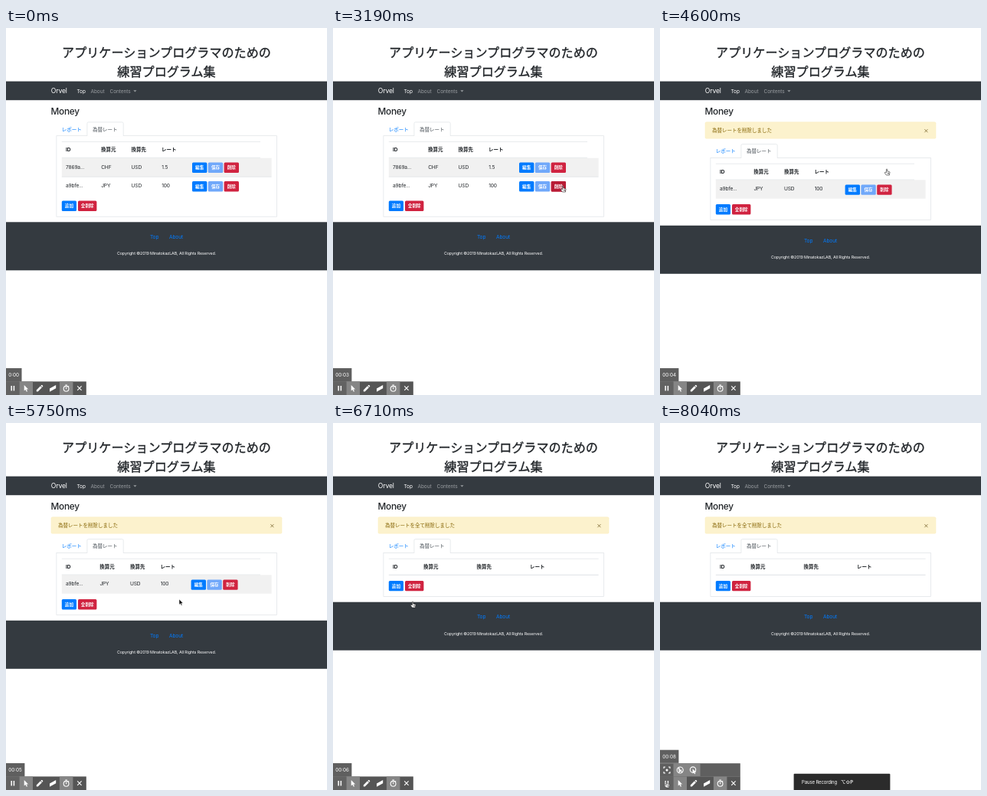
An HTML page for the animation above (8.34 s loop, 419x479 px).

```html
<!DOCTYPE html>
<html lang="ja">
<head>
<meta charset="utf-8">
<title>Money</title>
<style>
html, body { margin: 0; width: 100%; height: 100%; overflow: hidden; background: #fff; }
svg { display: block; width: 419px; height: 479px; }
text { font: 6.6px Inter, sans-serif; letter-spacing: -.02em; }
.ja { font: 6.5px "Noto Sans CJK JP", "Noto Sans CJK", sans-serif; letter-spacing: 0; }
.title { font-size: 16.1px; text-anchor: middle; stroke: #212529; stroke-width: .35; }
.btn { font-size: 5.6px; font-weight: 600; text-anchor: middle; fill: #fff; }
.b { font-weight: 700; }
.line { fill: none; stroke: #dee2e6; stroke-width: .7; }
.icon { fill: none; stroke: #fff; stroke-width: 1.1; }
.solid { fill: #fff; stroke: none; }
.clock { font-size: 6.3px; fill: #fff; letter-spacing: 0; }

/* one shared 8.34 s clock, hard steps throughout */
.a { animation: 8340ms step-end infinite; }
.list { animation-name: list; }
.one { animation-name: one; }
.none { animation-name: none-left; }
.first { animation-name: first; }
.later { animation-name: later; }
.digits { animation-name: digits; }
.dock { animation-name: dock; }
.extra { animation-name: extra; }
.tip { animation-name: tip; }
.move { animation-name: move; }
.arrow { animation-name: arrow; }
.hand { animation-name: hand; }
.over2 { animation-name: over2; }
.over1 { animation-name: over1; }
.overAll { animation-name: over-all; }
.click1 { animation-name: click1; }
.click2 { animation-name: click2; }

@keyframes list { 0% { opacity: 1 } 55.16%, 100% { opacity: 0 } }
@keyframes one { 0% { opacity: 0 } 55.16% { opacity: 1 } 80.46%, 100% { opacity: 0 } }
@keyframes none-left { 0% { opacity: 0 } 80.46%, 100% { opacity: 1 } }
@keyframes first { 0% { opacity: 1 } 1.2%, 100% { opacity: 0 } }
@keyframes later { 0% { opacity: 0 } 1.2%, 100% { opacity: 1 } }
@keyframes digits {
  0% { transform: translateY(0) }
  13.07% { transform: translateY(-20px) }
  24.82% { transform: translateY(-40px) }
  36.1% { transform: translateY(-60px) }
  50% { transform: translateY(-80px) }
  62.35% { transform: translateY(-100px) }
  73.86% { transform: translateY(-120px) }
  86.57% { transform: translateY(-140px) }
  96.4%, 100% { transform: translateY(-160px) }
}
@keyframes dock { 0% { transform: translateY(0) } 94.84%, 100% { transform: translateY(-17.3px) } }
@keyframes extra { 0% { opacity: 0 } 94.84%, 100% { opacity: 1 } }
@keyframes tip { 0% { opacity: 0 } 96.4%, 100% { opacity: 1 } }
@keyframes move {
  0% { transform: translate(269px, 152px) }
  14.87% { transform: translate(262px, 158px) }
  16.67% { transform: translate(253px, 165px) }
  18.35% { transform: translate(245px, 169px) }
  29.62% { transform: translate(250px, 216px) }
  31.77% { transform: translate(266px, 214px) }
  33.93% { transform: translate(281px, 211px) }
  36.1% { transform: translate(292px, 207px) }
  38.25% { transform: translate(300px, 206px) }
  44.96% { transform: translate(299px, 203px) }
  46.64% { transform: translate(298px, 198px) }
  48.32% { transform: translate(297px, 193px) }
  50% { transform: translate(296px, 187px) }
  51.68% { transform: translate(296px, 184px) }
  59.95% { transform: translate(288px, 202px) }
  62.35% { transform: translate(268px, 218px) }
  67.27% { transform: translate(252px, 223px) }
  68.94% { transform: translate(226px, 230px) }
  70.62% { transform: translate(196px, 236px) }
  72.18% { transform: translate(164px, 241px) }
  73.86% { transform: translate(135px, 241px) }
  75.54% { transform: translate(117px, 237px) }
  77.22% { transform: translate(104px, 233px) }
  86.57% { transform: translate(99px, 262px) }
  88.25% { transform: translate(84px, 305px) }
  89.81% { transform: translate(64px, 352px) }
  91.49% { transform: translate(42px, 400px) }
  93.17% { transform: translate(22px, 440px) }
  94.84% { transform: translate(11px, 463px) }
  96.4%, 100% { transform: translate(8.5px, 468px) }
}
@keyframes arrow {
  0% { opacity: 0 } 13.07% { opacity: 1 } 24.82% { opacity: 0 }
  29.62% { opacity: 1 } 36.1% { opacity: 0 } 46.64% { opacity: 1 } 50% { opacity: 0 }
  59.95% { opacity: 1 } 77.22% { opacity: 0 } 82.49% { opacity: 1 } 96.4%, 100% { opacity: 0 }
}
@keyframes hand {
  0% { opacity: 0 } 36.1% { opacity: 1 } 46.64% { opacity: 0 }
  50% { opacity: 1 } 59.95% { opacity: 0 }
  77.22% { opacity: 1 } 82.49% { opacity: 0 } 96.4%, 100% { opacity: 1 }
}
@keyframes over2 { 0% { opacity: 0 } 36.1% { opacity: 1 } 46.64%, 100% { opacity: 0 } }
@keyframes over1 { 0% { opacity: 0 } 50% { opacity: 1 } 55.16%, 100% { opacity: 0 } }
@keyframes over-all { 0% { opacity: 0 } 77.22% { opacity: 1 } 80.46%, 100% { opacity: 0 } }
@keyframes click1 { 0% { opacity: 0 } 53.48% { opacity: 1 } 55.16%, 100% { opacity: 0 } }
@keyframes click2 { 0% { opacity: 0 } 78.9% { opacity: 1 } 80.46%, 100% { opacity: 0 } }
</style>
</head>
<body>
<svg viewBox="0 0 419 479" fill="#212529">
  <defs>
    <g id="edit"><rect width="19.4" height="13.4" rx="1.5"/><text class="ja btn" x="9.7" y="8.9">編集</text></g>
    <g id="save"><rect width="19.4" height="13.4" rx="1.5"/><text class="ja btn" x="9.7" y="8.9">保存</text></g>
    <g id="del"><rect width="19.4" height="13.4" rx="1.5"/><text class="ja btn" x="9.7" y="8.9">削除</text></g>
    <g id="add"><rect width="19.2" height="13.4" rx="1.5"/><text class="ja btn" x="9.6" y="8.9">追加</text></g>
    <g id="delAll"><rect width="24.4" height="13.4" rx="1.5"/><text class="ja btn" x="12.2" y="8.9">全削除</text></g>
    <g id="rowBtns">
      <use href="#edit" fill="#007bff"/>
      <use href="#save" x="20.8" fill="#70a8fa"/>
      <use href="#del" x="41.6" fill="#d02340"/>
    </g>
    <g id="tableBtns">
      <use href="#add" x="72.8" fill="#007bff"/>
      <use href="#delAll" x="94" fill="#d02340"/>
    </g>
    <g id="tabs">
      <path d="M105.9 140.7V124.6q0-1.7 1.7-1.7H151.5q1.7 0 1.7 1.7V140.7" class="line"/>
      <path d="M106.3 140.6H152.8" stroke="#fff" stroke-width="1.2"/>
      <text class="ja" x="72.8" y="134.5" fill="#007bff">レポート</text>
      <text class="ja" x="113" y="134.5" fill="#495057">為替レート</text>
    </g>
    <g id="alert">
      <rect x="59" y="122.8" width="301" height="21.4" rx="1.5" fill="#fcf2cd" stroke="#fbecbc" stroke-width=".5"/>
      <path d="M345.4 132.2l4 4m0-4l-4 4" stroke="#85713a" stroke-width=".9"/>
    </g>
    <g id="footer">
      <rect width="419" height="63" fill="#343a40"/>
      <text x="188" y="21.8" fill="#007bff">Top</text>
      <text x="213" y="21.8" fill="#007bff">About</text>
      <text x="209.5" y="43" fill="#fff" text-anchor="middle" style="font-size:5.35px">Copyright ©2019 MinatokazLAB, All Rights Reserved.</text>
    </g>
  </defs>

  <text class="ja title" x="209.5" y="37.8">アプリケーションプログラマのための</text>
  <text class="ja title" x="209.5" y="62.8">練習プログラム集</text>
  <rect y="69.6" width="419" height="24.6" fill="#343a40"/>
  <text x="58.8" y="85.2" fill="#fff" style="font-size:8.6px">Orvel</text>
  <text x="92.5" y="84.6" fill="#fff">Top</text>
  <text x="110.5" y="84.6" fill="#999da0">About</text>
  <text x="135.6" y="84.6" fill="#999da0">Contents</text>
  <path d="M166.3 81.2h4.2l-2.1 2.2z" fill="#999da0"/>
  <text x="58.6" y="113" style="font-size:11.8px;font-weight:500">Money</text>

  <g class="a list">
    <rect class="line" x="65.9" y="140.7" width="287.6" height="105.5"/>
    <use href="#tabs"/>
    <path class="line" d="M72.8 148.5H332"/>
    <rect x="72.8" y="169.7" width="273.8" height="24.6" fill="#f1f1f1"/>
    <path class="line" d="M72.8 169.3H332M72.8 194.3H346.6"/>
    <text class="b" x="78" y="161.4">ID</text>
    <text class="ja b" x="124" y="161.4">換算元</text>
    <text class="ja b" x="163.5" y="161.4">換算先</text>
    <text class="ja b" x="203" y="161.4">レート</text>
    <text x="78" y="183.5">7869a...</text>
    <text x="124.2" y="183.5">CHF</text>
    <text x="163.6" y="183.5">USD</text>
    <text x="203.3" y="183.5">1.5</text>
    <use href="#rowBtns" x="243" y="175.6"/>
    <text x="78" y="207.9">a9bfe...</text>
    <text x="124.2" y="207.9">JPY</text>
    <text x="163.6" y="207.9">USD</text>
    <text x="203.3" y="207.9">100</text>
    <use href="#rowBtns" x="243" y="200"/>
    <use class="a over2" href="#del" x="284.6" y="200" fill="#b81c35"/>
    <use class="a over1" href="#del" x="284.6" y="175.6" fill="#b0142e"/>
    <rect class="a click1" x="284" y="175" width="20.6" height="14.6" rx="2" fill="none" stroke="#d02340" stroke-opacity=".5" stroke-width="1.4"/>
    <use href="#tableBtns" y="225.6"/>
    <use href="#footer" y="253.3"/>
  </g>

  <g class="a one">
    <use href="#alert"/>
    <text class="ja" x="68" y="136" fill="#856404">為替レートを削除しました</text>
    <rect class="line" x="65.9" y="169.4" width="287.6" height="81.1"/>
    <use href="#tabs" y="28.7"/>
    <path class="line" d="M72.8 177.2H332"/>
    <rect x="72.8" y="198.3" width="273.8" height="24.4" fill="#f1f1f1"/>
    <path class="line" d="M72.8 198H332"/>
    <text class="b" x="78" y="190.1">ID</text>
    <text class="ja b" x="122.2" y="190.1">換算元</text>
    <text class="ja b" x="162" y="190.1">換算先</text>
    <text class="ja b" x="201.5" y="190.1">レート</text>
    <text x="78" y="212.2">a9bfe...</text>
    <text x="122.4" y="212.2">JPY</text>
    <text x="162" y="212.2">USD</text>
    <text x="201.8" y="212.2">100</text>
    <use href="#rowBtns" x="241.6" y="204.4"/>
    <use href="#tableBtns" y="230"/>
    <use class="a overAll" href="#delAll" x="94" y="230" fill="#b0142e"/>
    <rect class="a click2" x="93.4" y="229.4" width="25.6" height="14.6" rx="2" fill="none" stroke="#d02340" stroke-opacity=".5" stroke-width="1.4"/>
    <use href="#footer" y="257.8"/>
  </g>

  <g class="a none">
    <use href="#alert"/>
    <text class="ja" x="68" y="136" fill="#856404">為替レートを全て削除しました</text>
    <rect class="line" x="65.9" y="169.4" width="287.6" height="57"/>
    <use href="#tabs" y="28.7"/>
    <path class="line" d="M72.8 177.2H346.6"/>
    <path class="line" d="M72.8 198.3H346.6" style="stroke-width:1"/>
    <text class="b" x="78" y="190.1">ID</text>
    <text class="ja b" x="118" y="190.1">換算元</text>
    <text class="ja b" x="187.6" y="190.1">換算先</text>
    <text class="ja b" x="257" y="190.1">レート</text>
    <use href="#tableBtns" y="205.9"/>
    <use href="#footer" y="233.7"/>
  </g>

  <!-- recorder bar -->
  <g class="a dock">
    <g class="a first">
      <rect y="444" width="20.5" height="17.5" fill="#5f5f5f"/>
      <text class="clock" x="3.2" y="455">0:00</text>
    </g>
    <g class="a later">
      <rect y="444" width="24.4" height="17.5" fill="#5f5f5f"/>
      <svg y="444" width="25" height="17">
        <g class="a digits">
          <text class="clock" x="3.2" y="11">00:00</text>
          <text class="clock" x="3.2" y="31">00:01</text>
          <text class="clock" x="3.2" y="51">00:02</text>
          <text class="clock" x="3.2" y="71">00:03</text>
          <text class="clock" x="3.2" y="91">00:04</text>
          <text class="clock" x="3.2" y="111">00:05</text>
          <text class="clock" x="3.2" y="131">00:06</text>
          <text class="clock" x="3.2" y="151">00:07</text>
          <text class="clock" x="3.2" y="171">00:08</text>
        </g>
      </svg>
    </g>
  </g>
  <g class="a extra">
    <rect y="444.2" width="104.8" height="17.5" fill="#5f5f5f"/>
    <rect x="17.5" y="444.2" width="35" height="17.5" fill="#858585"/>
    <g class="icon">
      <path d="M5 451v-2h2m4 0h2v2m0 4v2h-2m-4 0h-2v-2"/>
      <circle class="solid" cx="9" cy="453" r="1.5"/>
      <circle cx="26.2" cy="453" r="4"/>
      <path d="M23.4 450.2l5.6 5.6M25 450v5.6l3-3"/>
      <circle cx="43" cy="452.6" r="3.7"/>
      <path class="solid" d="M42.6 451.6v6l1.5-1.3 1 2 1.2-.6-1-2h2z"/>
    </g>
  </g>
  <rect y="461.4" width="104.8" height="17.6" fill="#555"/>
  <rect y="461.4" width="17.5" height="17.6" fill="#626262"/>
  <rect x="17.5" y="461.4" width="17.5" height="17.6" fill="#858585"/>
  <rect x="69.9" y="461.4" width="17.5" height="17.6" fill="#858585"/>
  <g class="icon">
    <path d="M7.2 467v6.6m3.2-6.6v6.6" stroke-width="1.5"/>
    <path class="solid" d="M23.7 466v7.6l1.8-1.6 1.3 2.8 1.2-.6-1.3-2.6h2.4z"/>
    <path class="solid" d="M39.8 474.4v-1.9l5.2-5.2 1.9 1.9-5.2 5.2zM45.5 466.8l.7-.7q.5-.4 1 0l.9.9q.4.5 0 1l-.7.7z"/>
    <path class="solid" d="M57 470.4l8.2-4.4v4.2l-8.2 4.6z"/>
    <circle cx="78.6" cy="470.8" r="3.4"/>
    <path d="M77.2 466h2.8M78.6 468.8v2.4M81.3 467.3l.8.8"/>
    <path d="M93.2 467.4l5.4 5.4m0-5.4l-5.4 5.4"/>
  </g>
  <g class="a tip">
    <rect x="174.6" y="457.8" width="125.8" height="22" rx="1" fill="#2b2b2b"/>
    <text x="185" y="470.8" fill="#fff" style="font-size:6px">Pause Recording</text>
    <text x="236" y="470.8" fill="#fff" style="font:600 6px Inter,'DejaVu Sans',sans-serif">⌥⇧P</text>
  </g>

  <g fill="none" stroke="#d8475c" stroke-width="1.8" stroke-opacity=".9">
    <circle class="a click1" cx="296.8" cy="184.8" r="13.7"/>
    <circle class="a click2" cx="104.6" cy="233.6" r="13.7"/>
  </g>
  <g class="a move">
    <path class="a arrow" d="M0 0V7.2L1.7 5.7 2.8 8.3 4 7.8 2.9 5.3H5.1z" fill="#111" stroke="#fff" stroke-width=".5"/>
    <path class="a hand" d="M-.6 4.9V.7Q-.6 0 0 0T.7.7V3L3 3.4Q4 3.6 4 4.6L3.5 6.6V8H-.6L-2.6 5.3Q-2.9 4.4-2 4.3-1.3 4.2-.6 4.9M1.4 4.6v2M2.6 4.8v1.8" fill="#fff" stroke="#222" stroke-width=".6"/>
  </g>
</svg>
</body>
</html>
```
